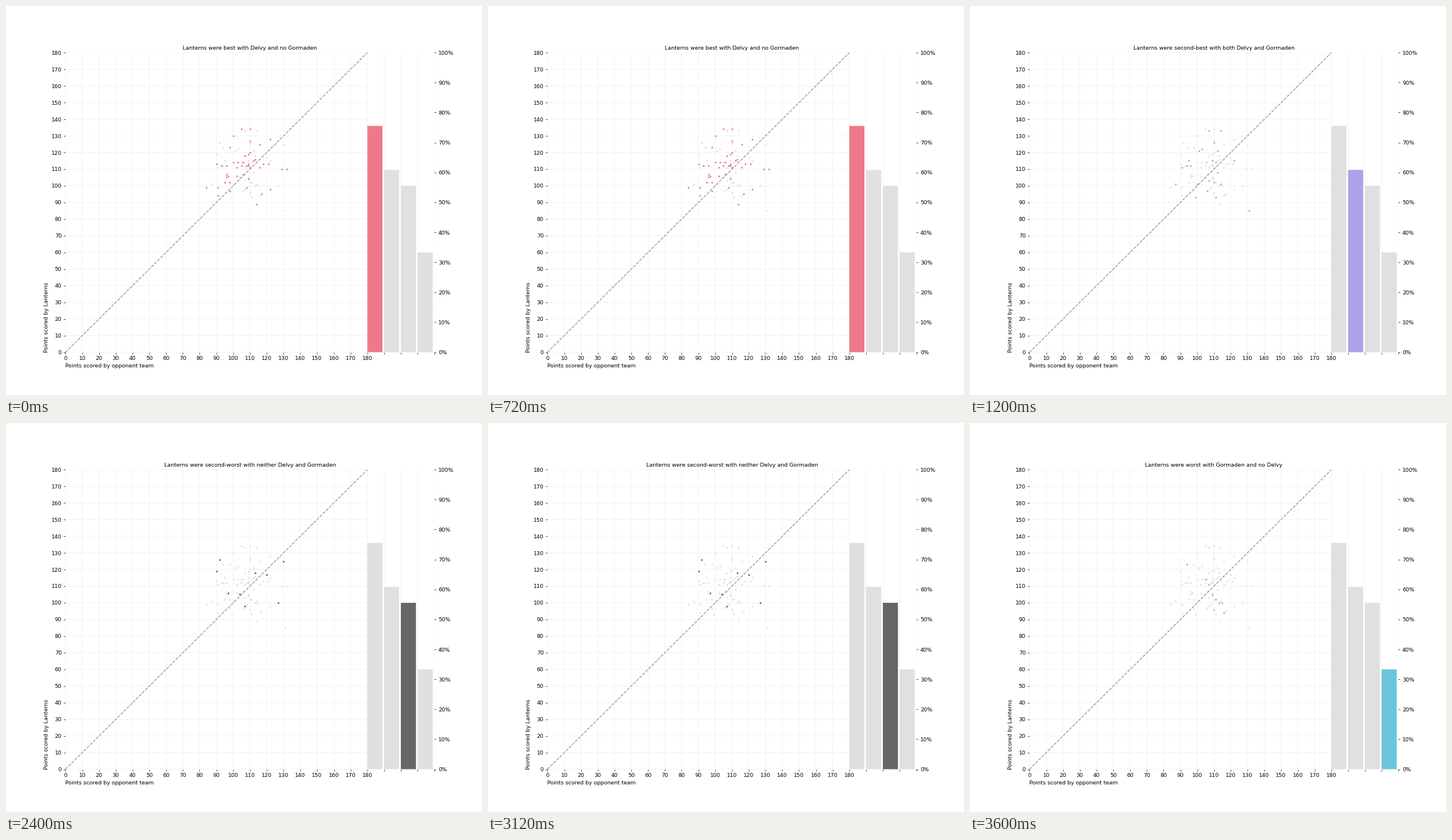
Animation of 827 by 677 pixels, one loop 4800 ms. Source, as a matplotlib script:

```python
import matplotlib.pyplot as plt
import numpy as np
from matplotlib.animation import FuncAnimation
from matplotlib.ticker import PercentFormatter

WIDTH, HEIGHT, DPI = 827, 677, 68
MUTED, GRID = "#e0e0e0", "#eeeeee"
TEAM, GUARD, WING = "Lanterns", "Delvy", "Gormaden"

plt.rcParams.update({"font.family": "DejaVu Sans", "font.size": 10,
                     "path.snap": False})

# wins, games, highlight colour, title
groups = [
    (34, 45, "#ef798a", f"best with {GUARD} and no {WING}"),
    (14, 23, "#ada2e8", f"second-best with both {GUARD} and {WING}"),
    (5, 9, "#666666", f"second-worst with neither {GUARD} and {WING}"),
    (3, 9, "#69c5db", f"worst with {WING} and no {GUARD}"),
]


def season(wins, games, rng):
    """Random (opponent, team) scores with the given number of wins."""
    scores = rng.normal(108, 11, (games, 2)).round().clip(82, 134)
    scores.sort(axis=1)
    scores[wins:] = scores[wins:, ::-1]
    return scores.T


def style_axes(ax, rate_ax):
    x_ticks = np.arange(0, 221, 10)
    y_ticks = np.arange(0, 181, 10)
    ax.set(xlim=(0, 220), ylim=(0, 180), yticks=y_ticks)
    ax.set_xticks(x_ticks, [str(x) if x <= 180 else "" for x in x_ticks])
    ax.set_xlabel("Points scored by opponent team", loc="left")
    ax.set_ylabel(f"Points scored by {TEAM}", loc="bottom")
    ax.set_axisbelow(True)
    ax.grid(axis="x", color=GRID, lw=0.8)
    ax.hlines(y_ticks, 0, 180, color=GRID, lw=0.8, zorder=0.5)
    rate_ax.set(ylim=(0, 1), yticks=np.arange(11) / 10)
    rate_ax.yaxis.set_major_formatter(PercentFormatter(1, decimals=0))
    for axes in (ax, rate_ax):
        axes.spines[:].set_visible(False)


fig, ax = plt.subplots(figsize=(WIDTH / DPI, HEIGHT / DPI), dpi=DPI)
style_axes(ax, ax.twinx())
ax.plot([0, 180], [0, 180], "--", color="#999999", lw=1.5)
title = ax.set_title("", fontsize=10)

rng = np.random.default_rng(30)
dots, bars = [], []
for i, (wins, games, *_) in enumerate(groups):
    dots.append(ax.scatter(*season(wins, games, rng), s=10, lw=0))
    bars += ax.bar(180 + 10 * i, 180 * wins / games, width=9, align="edge", lw=0)


def update(frame):
    title.set_text(f"{TEAM} were {groups[frame][3]}")
    for i, (cloud, bar) in enumerate(zip(dots, bars)):
        active = i == frame
        color = groups[i][2] if active else MUTED
        cloud.set_facecolor(color)
        cloud.set_zorder(1.2 if active else 1)
        bar.set_facecolor(color)
    return [title, *dots, *bars]


anim = FuncAnimation(fig, update, frames=len(groups),
                     init_func=lambda: update(0),
                     interval=1200, repeat=True, repeat_delay=0)
plt.show()
```
